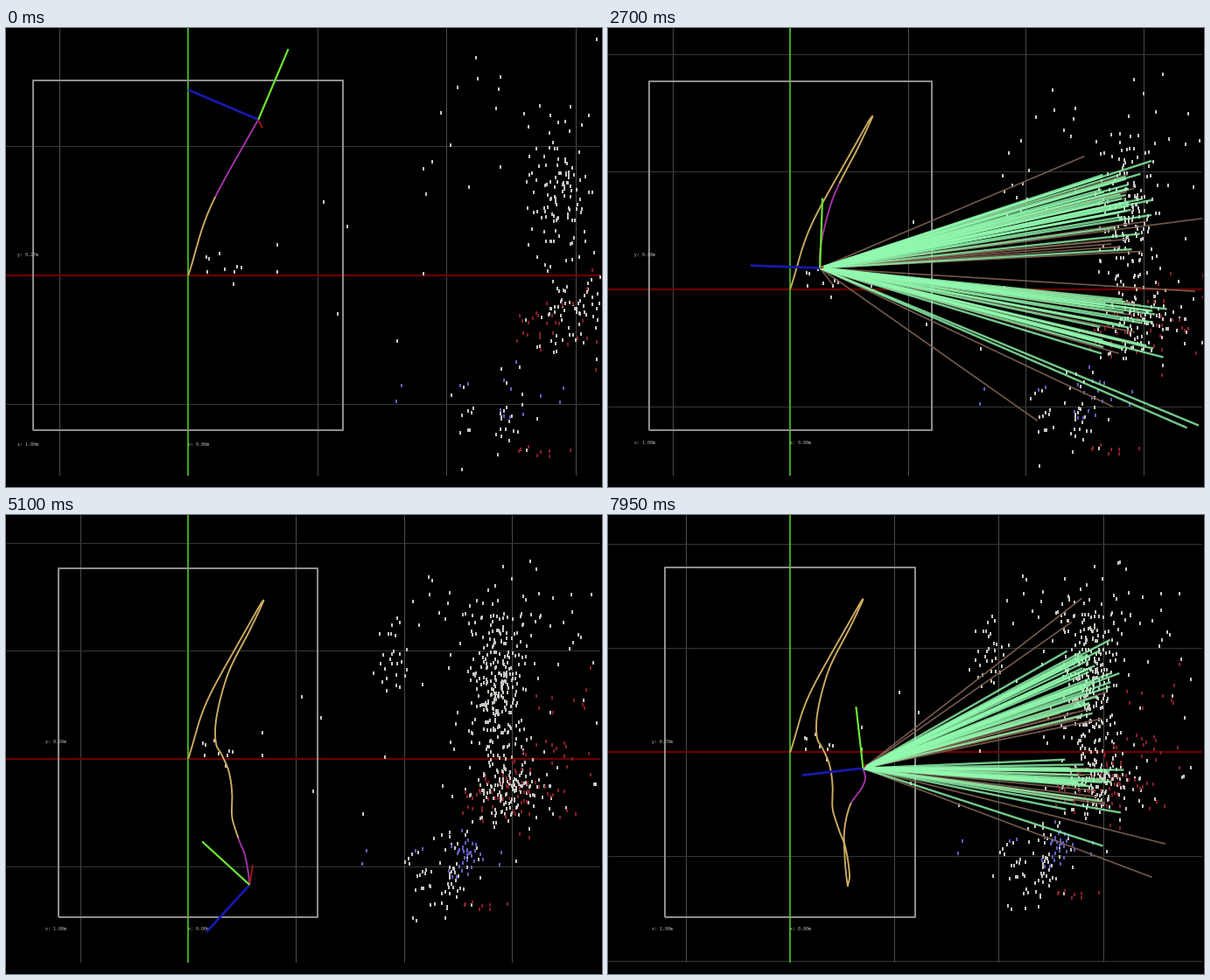
Animation, 681 px wide and 525 px high, one loop 8000 ms. Source, as a matplotlib script:

```python
import numpy as np
import matplotlib.pyplot as plt
from matplotlib.animation import FuncAnimation
from matplotlib.collections import LineCollection

W, H, DPI = 681, 525, 64
VIEW_W, VIEW_H = 679, 512
PT = 72 / DPI              # points per pixel
ORIGIN_X, TOP, BOTTOM = 208, 60.5, 460
STEP, TAIL = 0.15, 0.95    # seconds
rng = np.random.default_rng(11)


def rgb(r, g, b):
    return r / 255, g / 255, b / 255


WHITE, RED, BLUE = rgb(200, 198, 194), rgb(135, 30, 40), rgb(95, 95, 190)

# time, x, y of the moving camera
PATH = np.array([
    (-2.2, 0, 0), (-.95, .208, .605), (-.3, .445, 1.036), (0, .543, 1.208),
    (.75, .688, 1.459), (.95, .698, 1.463), (1.3, .59, 1.23),
    (1.95, .356, .753), (2.5, .252, .30), (2.8, .26, .13), (3.1, .309, .04),
    (3.45, .379, -.13), (3.75, .407, -.341), (3.95, .407, -.545),
    (4.15, .463, -.732), (4.5, .52, -.878), (5.1, .569, -1.171),
    (5.6, .556, -1.262), (5.95, .549, -1.269), (6.35, .524, -1.019),
    (6.55, .516, -.811), (6.9, .561, -.545), (7.4, .69, -.337),
    (7.7, .72, -.245), (7.95, .699, -.154)])

# time, angle of the green axis in degrees
POSE = np.array([(0, 67), (.75, 58.8), (1.95, 83.6), (3.45, 93), (5.1, 137.6),
                 (6.9, 102.5), (7.95, 96.5)])

SPARSE = np.array([
    (14, 14), (16, 13), (24, 17), (15, 3), (28, 5), (36, 3), (38, 7), (41, 6),
    (35, -7), (69, 24), (69, 3), (105, 57), (123, 38), (116, -30), (162, -51),
    (182, 1), (182, 83), (189, 88), (203, 101), (196, 126), (184, 63)]) / 100

# count, mean x, mean y, spread x, spread y, last birth
WHITE_CLOUDS = [
    (105, 2.87, .64, .13, .26, 0), (150, 2.85, .65, .15, .40, 5),
    (75, 3.0, -.3, .14, .17, 0), (75, 2.95, -.3, .18, .21, 5),
    (45, 3.0, 1.35, .3, .22, 6), (25, 3.5, .5, .22, .6, 0),
    (14, 2.5, 1.1, .22, .25, 0),
    (32, 2.35, -1.1, .2, .22, 0), (35, 2.35, -1.1, .22, .22, 6),
    (30, 1.95, .95, .11, .17, 6)]
BLUE_CLOUDS = [(14, 2.4, -.9, .28, .18, 0), (24, 2.6, -.88, .06, .08, 5)]
RED_CLOUDS = [
    (18, 2.75, -.38, .1, .08, 0), (14, 3.15, -.3, .2, .15, 0),
    (8, 2.8, -1.36, .12, .03, 0), (28, 3.4, .1, .25, .35, 5),
    (28, 3.0, -.28, .15, .15, 5)]

# Rays run while the camera tracks; outlying ones: x, y, first and last time
TRACKING = [(1.35, 4.3), (6.1, 8)]
GOOD_OUTLIERS = np.array([
    (3.07, 1.09, 1, 2.7), (3.41, 1.24, 2.7, 5), (3.07, 1.08, 7.4, 8),
    (3.47, -1.16, 1, 5), (3.37, -1.18, 1, 2.7), (3.17, -.58, 1, 8),
    (3.07, .63, 1, 8), (3.2, -.17, 1, 8), (3, -.9, 2.7, 5), (3, -.9, 7.4, 8)])
WEAK_OUTLIERS = np.array([
    (2.5, 1.13, 1, 2.7), (3.5, .6, 1, 5), (3.44, -.02, 1, 5),
    (2.74, -1, 1, 5), (2.1, -1.12, 1, 5), (.69, .035, 1, 2.7),
    (.36, .04, 1, 2.7), (2.87, 1.44, 2.7, 5), (3.04, 1.33, 2.7, 5),
    (3.47, -1.2, 2.7, 8), (2.3, 1.1, 6, 7.4), (2.51, 1.13, 6, 7.4),
    (3.7, 1.35, 6, 7.4), (3.7, 1.17, 6, 7.4), (.69, .04, 6, 7.4),
    (2.8, 1.48, 7.4, 8), (2.7, 1.25, 7.4, 8), (3.6, -.88, 7.4, 8)])


def smooth(t, keys):
    """Cubic Hermite interpolation of rows (time, values...)."""
    k, v = keys[:, 0], keys[:, 1:]
    m = np.gradient(v, k, axis=0)
    t = np.clip(np.atleast_1d(t), k[0], k[-1])
    i = np.clip(np.searchsorted(k, t, 'right') - 1, 0, len(k) - 2)
    h = (k[i + 1] - k[i])[:, None]
    u = (t - k[i])[:, None] / h
    return ((2 * u**3 - 3 * u**2 + 1) * v[i] + (u**3 - 2 * u**2 + u) * h * m[i]
            + (3 * u**2 - 2 * u**3) * v[i + 1] + (u**3 - u**2) * h * m[i + 1])


def make_cloud(clouds):
    """Rows of x, y and time of birth."""
    return np.vstack([
        np.c_[rng.normal(x, sx, n), rng.normal(y, sy, n),
              rng.uniform(1.5 if last else -1, last, n)]
        for n, x, y, sx, sy, last in clouds])


def make_landmarks(n_upper, n_lower):
    upper = np.c_[rng.normal(2.83, .1, n_upper), rng.uniform(.28, .98, n_upper)]
    lower = np.c_[rng.uniform(2.62, 3.1, n_lower), rng.uniform(-.55, -.06, n_lower)]
    xy = np.vstack([upper, lower])
    return xy, rng.uniform(0, 2 * np.pi, len(xy))


sparse = np.c_[SPARSE, np.full(len(SPARSE), -1)]
points = {WHITE: np.vstack([sparse, make_cloud(WHITE_CLOUDS)]),
          RED: make_cloud(RED_CLOUDS), BLUE: make_cloud(BLUE_CLOUDS)}
good, weak = make_landmarks(42, 30), make_landmarks(16, 14)

fig = plt.figure(figsize=(W / DPI, H / DPI), dpi=DPI, facecolor='black')
ax = fig.add_axes([0, 1 - VIEW_H / H, VIEW_W / W, VIEW_H / H])
ax.set(xlim=(0, VIEW_W), ylim=(VIEW_H, 0))
ax.axis('off')


def line(color, width, z):
    return ax.plot([], [], color=color, lw=width * PT, zorder=z,
                   solid_capstyle='butt')[0]


def bundle(color, width, z, **style):
    lines = LineCollection([], colors=[color], linewidths=width * PT, zorder=z, **style)
    return ax.add_collection(lines, autolim=False)


grid_v = bundle(rgb(70, 76, 70), 1, 1)
grid_h = bundle(rgb(48, 58, 48), 1, 1)
axis_x = line(rgb(105, 0, 0), 2.4, 2)
axis_y = line(rgb(62, 165, 30), 2, 2.1)
frame_box = line(rgb(142, 142, 142), 2, 2.2)
trail = line(rgb(205, 172, 96), 1.9, 4)
tail = line(rgb(165, 50, 170), 1.9, 4.1)
weak_rays = bundle(rgb(126, 97, 80), 1.7, 5, alpha=.9)
good_rays = bundle(rgb(145, 250, 175), 2.4, 5.1, alpha=.8)
pose_axes = [line(rgb(155, 20, 25), 2, 6), line(rgb(24, 24, 170), 2.8, 6),
             line(rgb(108, 228, 50), 2.2, 6)]
speck = [(-.55, -1), (.55, -1), (.55, 1), (-.55, 1), (-.55, -1)]
dots = {color: ax.plot([], [], ls='', marker=speck, ms=3.5 * PT, mew=0,
                       color=color, zorder=3)[0] for color in points}
labels = [ax.text(0, 0, s, color=rgb(190, 190, 190), family='DejaVu Sans Mono',
                  size=5 * PT, va='center', zorder=3)
          for s in ('y: 0.00m', 'x: 1.00m', 'x: 0.00m')]


def update(i):
    t = STEP * (i // 3)
    times = np.append(np.arange(-2.2, t, .03), t)
    walk = smooth(times, PATH)
    cam = walk[-1]
    angle = smooth(t, POSE)[0, 0]

    # The view always fits the walked path with a margin.
    high = walk[:, 1].max() + .3
    low = min(-1.2, walk[:, 1].min() - .3)
    scale = (BOTTOM - TOP) / (high - low)
    oy = TOP + high * scale

    def to_px(p):
        return np.asarray(p) * (scale, -scale) + (ORIGIN_X + .2, oy)

    n = np.arange(-5, 6)
    n = n[n != 0]
    grid_v.set_segments([[(x, 0), (x, VIEW_H)] for x in ORIGIN_X + .2 + n * scale])
    grid_h.set_segments([[(0, y), (VIEW_W, y)] for y in oy + n * scale])
    axis_x.set_data([0, VIEW_W], [oy, oy])
    axis_y.set_data([ORIGIN_X + .2] * 2, [0, VIEW_H])
    box = to_px([(-1.2, low), (-1.2, high), (1.2, high), (1.2, low), (-1.2, low)])
    frame_box.set_data(*box.T)

    trail.set_data(*to_px(walk[times <= t - TAIL + .03]).T)
    tail.set_data(*to_px(walk[times >= t - TAIL]).T)
    a = np.radians(angle)
    tips = [(.03, .0035 * (angle - 85)), (-.59 * np.sin(a), .59 * np.cos(a)),
            (.595 * np.cos(a), .595 * np.sin(a))]
    for artist, tip in zip(pose_axes, tips):
        artist.set_data(*to_px([cam, cam + tip]).T)

    for color, p in points.items():
        dots[color].set_data(*to_px(p[p[:, 2] <= t, :2]).T)

    def rays(landmarks, outliers):
        if not any(start <= t < end for start, end in TRACKING):
            return []
        xy, phase = landmarks
        seen = np.sin(phase + 1.7 * t) > -.45
        near = (outliers[:, 2] <= t) & (t < outliers[:, 3])
        ends = to_px(np.vstack([xy[seen], outliers[near, :2]]))
        return [(to_px(cam), end) for end in ends]

    good_rays.set_segments(rays(good, GOOD_OUTLIERS))
    weak_rays.set_segments(rays(weak, WEAK_OUTLIERS))

    left, under = ORIGIN_X - 1.323 * scale, BOTTOM + .11 * scale
    labels[0].set_text(f'y: {.8 * (high - low) - 1.9:.2f}m')
    for text, pos in zip(labels, [(left, 259), (left, under), (ORIGIN_X, under)]):
        text.set_position(pos)
    return []


anim = FuncAnimation(fig, update, frames=160, interval=50, repeat=True,
                     repeat_delay=0, blit=False)
plt.show()
```
